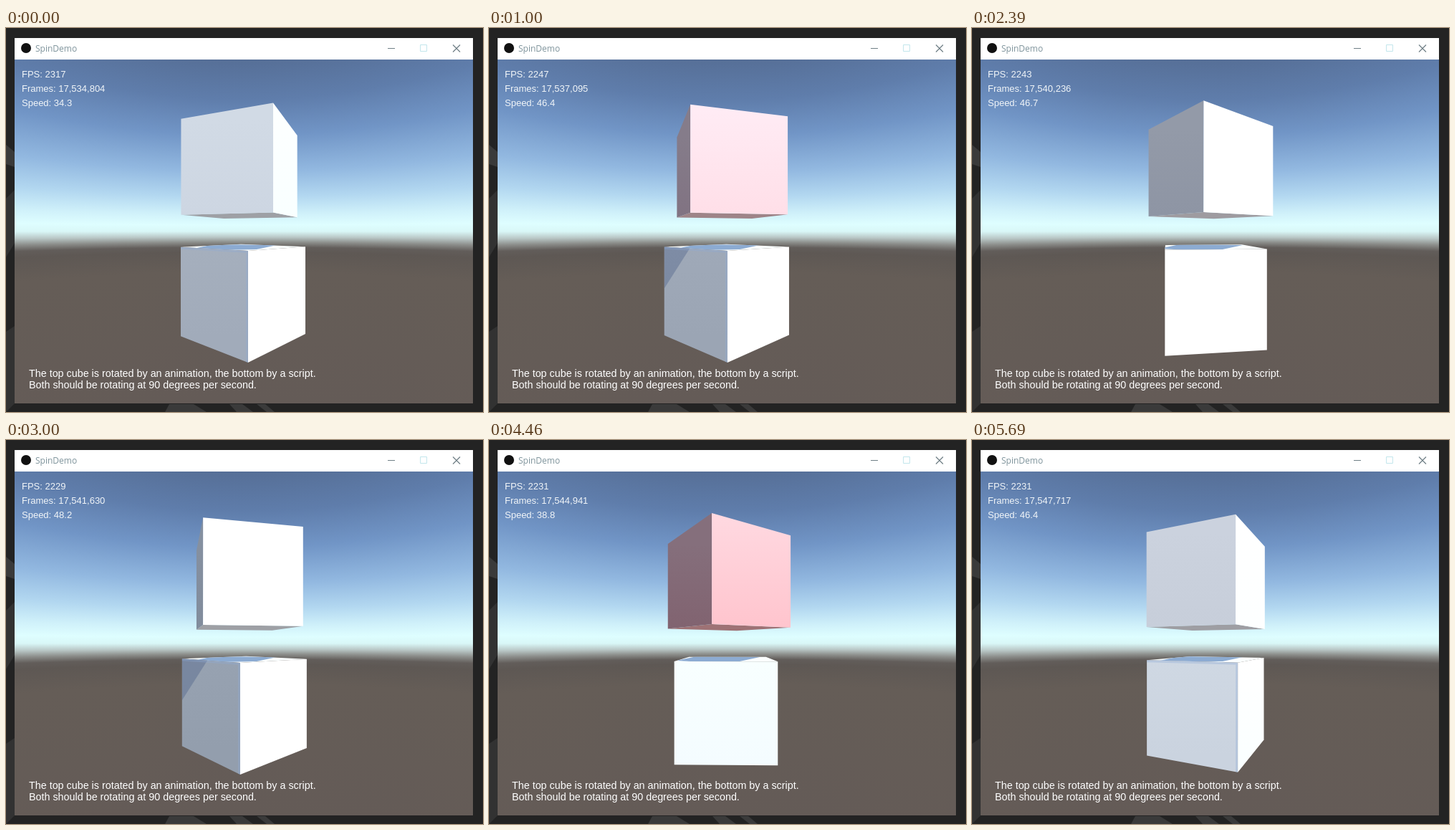
Write an HTML page with a canvas that moves like this. It is 666x536 px and loops after 5770 ms.

```html
<!DOCTYPE html>
<html lang="en">
<head>
<meta charset="utf-8">
<title>SpinDemo</title>
<style>
html, body { margin: 0; width: 100%; height: 100%; overflow: hidden; background: #232323; }
canvas, svg { position: absolute; left: 0; top: 0; }
text { font-family: "Liberation Sans", Arial, sans-serif; fill: #f1f5f8; }
.stat { font-size: 13px; }
.note { font-size: 14.34px; fill: #fff; }
.title { font: 12px "Open Sans", sans-serif; fill: #7f949c; }
</style>
</head>
<body>
<canvas id="view" width="666" height="536"></canvas>
<svg width="666" height="536">
  <path fill="#3a3a3a" d="M0 163L12 173V194L0 190ZM228 525H262L280 536H222ZM312 525H330L345 536H322ZM350 525H362L375 536H364Z"/>
  <path fill="#323232" d="M0 238L12 226V300L0 320ZM0 424L12 416V524L0 536Z"/>
  <path fill="#fff" d="M12 14H652V44H12Z"/>
  <circle cx="28" cy="28" r="7" fill="#111"/>
  <text class="title" x="41" y="33">SpinDemo</text>
  <g fill="none" stroke="#6f7f86">
    <path d="M533 28.5H543"/>
    <path d="M578.5 23.5H587.5V32.5H578.5Z" stroke="#c3e6ec"/>
    <path d="M624 23.500L634 33.500M634 23.500L624 33.500" stroke-width="1.2"/>
  </g>
  <text class="stat" id="fps" x="22" y="69"></text>
  <text class="stat" id="frames" x="22" y="89"></text>
  <text class="stat" id="speed" x="22" y="109"></text>
  <text class="note" x="32" y="487">The top cube is rotated by an animation, the bottom by a script.</text>
  <text class="note" x="32" y="503">Both should be rotating at 90 degrees per second.</text>
</svg>
<script>
const LOOP = 5770, STEP = 77, LAST = 74;
const CX = 332, CY = 284, FOCAL = 415.7, DIST = 3.374, RADIUS = Math.SQRT1_2;
const cosd = a => Math.cos(a * Math.PI / 180);
const sind = a => Math.sin(a * Math.PI / 180);
const $ = id => document.getElementById(id);
const ctx = $('view').getContext('2d');

// Values at these steps; motion is linear between them
const marks = [0, 13, 24, 39, 48, 58, LAST];
const topAngle = [22.3, -28.5, -70, -122.5, -158.3, -191, -250.6];
const bottomAngle = [3.1, -89.5, -167.9, -272.6, -337.1, -406, -518.8];
const tints = [1, .825, .945, 1, .877, .71, .99];
const counts = [17534804, 17537095, 17539017, 17541630, 17543206, 17544941, 17547717];

// Readouts that jump: [time, value]
const fpsSteps = [[0, 2317], [500, 2247], [1500, 2243], [2560, 2229], [3500, 2234], [4430, 2231]];
const speedSteps = [[0, 34.3], [700, 46.4], [1400, 45.2], [2100, 46.7], [2560, 48.2], [3850, 46.1], [4400, 38.8], [5080, 46.4]];

function lerp(values, i) {
  let k = 0;
  while (k < marks.length - 2 && i >= marks[k + 1]) k++;
  return values[k] + (values[k + 1] - values[k]) * (i - marks[k]) / (marks[k + 1] - marks[k]);
}
const held = (steps, t) => steps.filter(s => s[0] <= t).pop()[1];

// Each column is stretched about the horizon, as a wide lens does with a dome
function makeSky() {
  const sky = document.createElement('canvas');
  sky.width = 666;
  sky.height = 536;
  const c = sky.getContext('2d');
  c.fillStyle = '#232323';
  c.fillRect(0, 0, 666, 536);
  const g = c.createLinearGradient(0, -240, 0, 240);
  const stops = [[44, '#566f97'], [100, '#5f7dab'], [150, '#7195c6'], [200, '#92b8e0'], [235, '#b2d7f0'],
    [260, '#d0f1fa'], [275, '#defeff'], [284, '#d9f7f7'], [292, '#b9c7c6'], [299, '#8c8e8b'],
    [306, '#625d5a'], [313, '#5e5854'], [340, '#655d57'], [524, '#645b57']];
  for (const [y, color] of stops) g.addColorStop((y - 44) / 480, color);
  c.fillStyle = g;
  for (let x = 12; x < 652; x++) {
    const k = Math.hypot(1, (x + .5 - CX) / FOCAL);
    c.setTransform(1, 0, 0, k, x, CY);
    c.fillRect(0, -240 / k, 1, 480 / k);
  }
  return sky;
}
const sky = makeSky();

function project(angle, y) {
  const z = DIST - RADIUS * cosd(angle);
  return [CX + FOCAL * RADIUS * sind(angle) / z, CY - FOCAL * y / z];
}
function trace(points) {
  ctx.beginPath();
  for (const p of points) ctx.lineTo(...p);
}
function fillPoly(points, color) {
  trace(points);
  ctx.closePath();
  ctx.fillStyle = color;
  ctx.fill();
}
function clipped(points, paint) {
  ctx.save();
  trace(points);
  ctx.clip();
  paint();
  ctx.restore();
}

function shade(lit, tint) {
  return `rgb(${131 + 142 * lit},${(142 + 138 * lit) * tint},${(158 + 130 * lit) * (tint * .97 + .03)})`;
}

function cube(angle, low, tint) {
  const high = low + 1, isTop = low > 0;
  const corners = [0, 90, 180, 270].map(a => angle + a);

  const cap = corners.map(a => project(a, isTop ? low : high));
  fillPoly(cap, isTop ? `rgb(158,${160 * tint},${165 * tint})` : '#fbffff');
  if (!isTop) clipped(cap, () =>
    fillPoly([[262, 308], [290, 302], [378, 303], [350, 309], [300, 310]], '#8cabd2'));

  for (const a of corners) {
    const normal = a + 45;
    if (DIST * cosd(normal) <= .5) continue;
    const side = Math.atan2(sind(normal), cosd(normal)) * 180 / Math.PI;
    const lit = Math.max(0, cosd(side - 35));
    const face = [project(a, high), project(a + 90, high), project(a + 90, low), project(a, low)];
    const g = ctx.createLinearGradient(0, face[0][1], 0, face[3][1]);
    g.addColorStop(0, shade(lit + .015, tint + (1 - tint) * .2));
    g.addColorStop(1, shade(lit - .015, tint));
    fillPoly(face, g);

    if (!isTop && lit < .7) clipped(face, () => {
      const [x, y] = face[0];
      const dark = Math.min(1, Math.max(0, (-42 - side) / 2.5));
      fillPoly([[x, y - 3], [x + 37, y - 3], [x + 35, y + 3], [x, y + 58]], `rgba(75,95,135,${.4 * dark})`);
      trace(face.slice(0, 3));
      ctx.strokeStyle = 'rgba(140,168,212,.35)';
      ctx.lineWidth = 6;
      ctx.stroke();
    });
  }
}

function draw(now) {
  const t = now % LOOP;
  const i = Math.min(LAST, Math.floor(t / STEP + .12));
  ctx.drawImage(sky, 0, 0);
  cube(lerp(topAngle, i), .174, lerp(tints, i));
  cube(lerp(bottomAngle, i), -1.174, 1);
  $('fps').textContent = 'FPS: ' + held(fpsSteps, t);
  $('frames').textContent = 'Frames: ' + Math.round(lerp(counts, i)).toLocaleString('en-US');
  $('speed').textContent = 'Speed: ' + held(speedSteps, t).toFixed(1);
}

let start;
function tick(now) {
  start ??= now;
  draw(now - start);
  requestAnimationFrame(tick);
}
draw(0);
requestAnimationFrame(tick);
</script>
</body>
</html>
```
